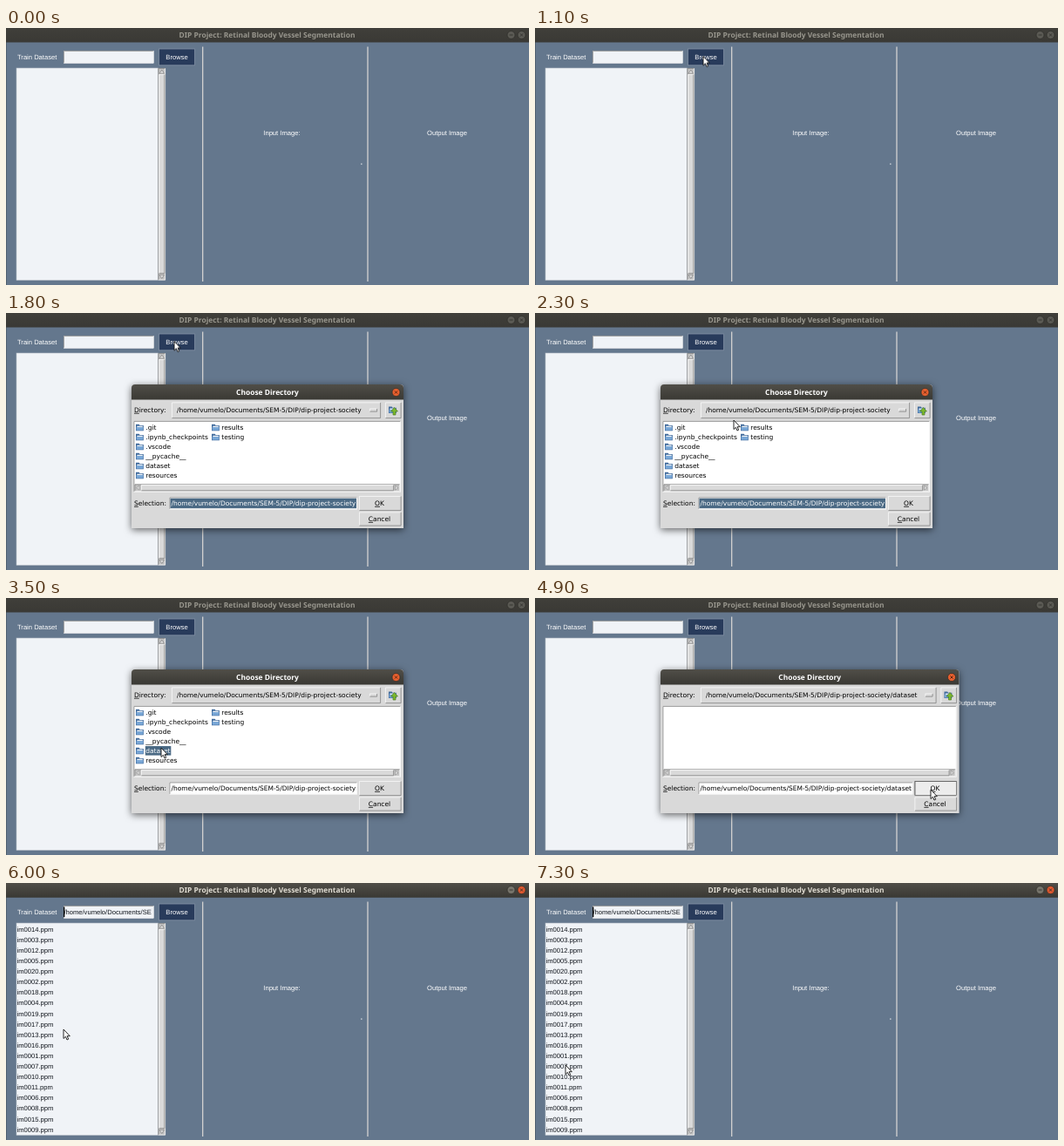
Write an HTML page that moves like this. It is 600 by 295 pixels and loops after 8000 ms.

```html
<!DOCTYPE html>
<html lang="en">
<head>
<meta charset="utf-8">
<title>Vessel segmentation</title>
<style>
html, body { margin: 0; width: 100%; height: 100%; overflow: hidden; background: #64778d; }
svg { display: block; width: 600px; height: 295px; }
text { white-space: pre; text-rendering: geometricPrecision; }
.app { font: 7.6px "Liberation Sans", Arial, sans-serif; fill: #fff; }
.ink { fill: #10151c; }
.tk { font: 7.47px "DejaVu Sans", sans-serif; fill: #000; }
.title { font: bold 8.42px "Noto Sans", sans-serif; text-anchor: middle; }
.mid { text-anchor: middle; }
.key { text-decoration: underline; }
.light { fill: #fff; }

.active, .loaded, .caret, .first, .picked, .wide, .combo-hover, .ok-hover, .ok-press, .cursor {
  animation: 8s step-end infinite;
  opacity: 0;
}
.active { animation-name: active; }
.loaded { animation-name: loaded; }
.caret { animation-name: caret; }
.first { animation-name: first; }
.narrow { animation: narrow 8s step-end infinite; }
.picked { animation-name: picked; }
.wide { animation-name: wide; }
.combo-hover { animation-name: combo-hover; }
.ok-hover { animation-name: ok-hover; }
.ok-press { animation-name: ok-press; }
.cursor { animation: appear 8s step-end infinite, move 8s linear infinite; }
.dialog { transform-origin: 300px 165px; animation: dialog 8s linear infinite; }

@keyframes active { 0%, 19.375% { opacity: 0 } 15%, 66.25%, 100% { opacity: 1 } }
@keyframes loaded { 0% { opacity: 0 } 66.25%, 100% { opacity: 1 } }
@keyframes caret { 0%, 82.5% { opacity: 0 } 66.25%, 86.25%, 100% { opacity: 1 } }
@keyframes first { 0% { opacity: 1 } 42.5%, 100% { opacity: 0 } }
@keyframes narrow { 0% { opacity: 1 } 46.25%, 100% { opacity: 0 } }
@keyframes picked { 0% { opacity: 0 } 42.5%, 100% { opacity: 1 } }
@keyframes wide { 0% { opacity: 0 } 46.25%, 100% { opacity: 1 } }
@keyframes combo-hover { 0%, 28.6%, 100% { opacity: 0 } 27.4% { opacity: 1 } }
@keyframes ok-hover { 0% { opacity: 0 } 55%, 100% { opacity: 1 } }
@keyframes ok-press { 0% { opacity: 0 } 60%, 100% { opacity: 1 } }
@keyframes appear { 0% { opacity: 0 } 3.75%, 100% { opacity: 1 } }
@keyframes dialog {
  0% { transform: scaleY(0); opacity: 0 }
  19.125% { transform: scaleY(0); opacity: 0; animation-timing-function: cubic-bezier(.25, .46, .45, .94) }
  22.25% { transform: none; opacity: 1 }
  63.2% { transform: none; opacity: 1; animation-timing-function: cubic-bezier(.25, .46, .45, .94) }
  66.25%, 100% { transform: scaleY(0); opacity: 0 }
}
@keyframes move {
  0%, 3.75% { transform: translate(561px, 126px); animation-timing-function: ease-in-out }
  13.75%, 23.75% { transform: translate(193px, 32.5px) }
  25% { transform: translate(199px, 60px) }
  27.5% { transform: translate(215px, 104px) }
  28.75% { transform: translate(228px, 123px); animation-timing-function: ease-in-out }
  36.25% { transform: translate(189px, 173px) }
  40%, 50.5% { transform: translate(178px, 172px); animation-timing-function: ease-in-out }
  55% { transform: translate(452px, 226px) }
  56.25%, 67.5% { transform: translate(454px, 220px); animation-timing-function: ease-in-out }
  73.75%, 75.5% { transform: translate(66px, 168px) }
  78.75% { transform: translate(72px, 182px) }
  81.25% { transform: translate(30px, 212px) }
  83.75%, 100% { transform: translate(35px, 209px) }
}
</style>
</head>
<body>
<svg id="stage" viewBox="0 0 600 295" xmlns="http://www.w3.org/2000/svg"></svg>
<script>
const rect = (x, y, w, h, fill, more = '') =>
  `<rect x="${x}" y="${y}" width="${w}" height="${h}" fill="${fill}" ${more}/>`;
const line = (d, stroke, width = 1) =>
  `<path d="${d}" fill="none" stroke="${stroke}" stroke-width="${width}"/>`;
const text = (x, y, s, cls) => `<text x="${x}" y="${y}" class="${cls}">${s}</text>`;
const group = (cls, ...parts) => `<g class="${cls}">${parts.join('')}</g>`;
const key = word => `<tspan class="key">${word[0]}</tspan>${word.slice(1)}`;

function bevel(x, y, w, h, fill = '#d9d9d9', sunken = false) {
  const [lit, dark] = sunken ? ['#828282', '#f4f4f4'] : ['#fafafa', '#828282'];
  const l = x + .4, t = y + .4, r = x + w - .4, b = y + h - .4;
  return rect(x, y, w, h, fill) +
    line(`M${l} ${b}V${t}H${r}`, lit, .8) + line(`M${l} ${b}H${r}V${t}`, dark, .8);
}

const folder = (x, y) =>
  `<path d="M${x} ${y + 8}v-7.5h3.6l1 1.3h4.2v6.2z" fill="#3f699b"/>` +
  rect(x + 1.3, y + 2.5, 6.5, 2, '#eef3f8') +
  rect(x + .6, y + 3.8, 7.7, 3.7, '#79a7d6');

function windowButton(x, y, fill, stroke, mark) {
  return `<circle cx="${x}" cy="${y}" r="4.5" fill="${fill}" stroke="#2c2b28" stroke-width=".7"/>` +
    line(mark === 'close'
      ? `M${x - 1.6} ${y - 1.6}l3.2 3.2m0-3.2l-3.2 3.2`
      : `M${x - 2} ${y}h4`, stroke, .9);
}

function titleBar(active) {
  return rect(0, 0, 600, 16.5, active ? 'url(#bar)' : 'url(#dimBar)') +
    text(299.5, 11, 'DIP Project: Retinal Bloody Vessel Segmentation',
      'title" fill="' + (active ? '#e0dcd2' : '#98968d')) +
    windowButton(579.5, 8, active ? '#77756c' : '#5b5a54', '#33322e', 'min') +
    windowButton(591.5, 8, active ? '#e2592f' : '#5b5a54', '#33322e', 'close');
}

function scrollbar() {
  return bevel(174.5, 46, 8.5, 243.5, '#c3c3c3', true) + bevel(175.3, 53, 7, 229) +
    `<path d="M178.8 48l2.8 4.2h-5.6zM178.8 287.6l2.8-4.2h-5.6z" fill="#d9d9d9" stroke="#777" stroke-width=".6"/>`;
}

function mainWindow() {
  const order = [14, 3, 12, 5, 20, 2, 18, 4, 19, 17, 13, 16, 1, 7, 10, 11, 6, 8, 15, 9];
  const files = order.map((n, i) =>
    text(12.6, 55.7 + i * 12.1, `im${String(n).padStart(4, '0')}.ppm`, 'app ink'));
  return rect(0, 0, 600, 295, '#64778d') + rect(0, 16, .7, 279, '#4b5866') +
    titleBar(false) + group('active', titleBar(true)) +
    text(13, 36.3, 'Train Dataset', 'app') +
    bevel(66, 26, 103.5, 14.5, '#f0f3f7', true) +
    rect(175.5, 24, 41, 18.8, '#283b5b', 'stroke="#8190a3" stroke-width=".8"') +
    text(196, 36.3, 'Browse', 'app mid') +
    rect(12, 46, 162.5, 243.5, '#f0f3f7', 'stroke="#b9c0c8" stroke-width=".6"') +
    scrollbar() +
    line('M225.7 21.5V291M415 21.5V291', '#dcdad7', 1.2) +
    text(295.3, 122.8, 'Input Image:', 'app') +
    text(483, 122.8, 'Output Image', 'app') +
    rect(407, 155.5, 1.6, 1.2, '#d5dae0') +
    group('loaded', ...files, text(66.4, 36.3, '/home/vumelo/Documents/SE', 'app ink')) +
    rect(66, 27.5, 1.3, 11.5, '#000', 'class="caret"');
}

const home = '/home/vumelo/Documents/SEM-5/DIP/dip-project-society';

// extra: how much wider the dialog is than its smallest size
function dialogFrame(extra, path) {
  const right = 456 + extra;
  const up = right - 21;
  const ok = right - 51;
  const center = right - 27.5;
  const bar = right - 153;
  return `<path d="M144 247V86q0-4 4-4H${right - 4}q4 0 4 4V247z" fill="#d9d9d9" filter="url(#shadow)"/>` +
    `<path d="M144 99.5V86q0-4 4-4H${right - 4}q4 0 4 4V99.5z" fill="url(#bar)"/>` +
    text((144 + right) / 2, 94, 'Choose Directory', 'title light') +
    windowButton(right - 8.5, 91, '#e9602f', '#54230f', 'close') +
    text(147, 113.8, key('Directory:'), 'tk') +
    bevel(190, 102.5, right - 216, 18.5) +
    group('combo-hover', rect(191, 103.5, right - 218, 16.5, '#ececec')) +
    text(196, 113.8, path, 'tk') +
    bevel(right - 39, 109.5, 9, 4) +
    bevel(up, 102.5, 18.5, 18.5) + folder(up + 4, 107) +
    `<path d="M${up + 9} 117v-4h-2.5l4-4.5 4 4.5h-2.5v4z" fill="#7cb82f" stroke="#41721a" stroke-width=".6"/>` +
    bevel(146.5, 124, right - 149.5, 81.5, '#fff', true) +
    bevel(147.5, 196.5, right - 151.5, 8.3, '#c3c3c3', true) +
    bevel(155, 197.2, bar - 13, 7) +
    `<path d="M149.5 200.7l3.5-2.5v5zM${right - 6} 200.7l-3.5-2.5v5z" fill="#d9d9d9" stroke="#888" stroke-width=".5"/>` +
    text(147, 220.9, key('Selection:'), 'tk') +
    bevel(187.5, 211.5, right - 240.5, 14, '#fff', true) +
    text(189.5, 220.9, path, 'tk') +
    bevel(ok, 210, 48.5, 17) +
    (extra ? group('ok-hover', bevel(ok, 210, 48.5, 17, '#ececec')) +
      group('ok-press', bevel(ok, 210, 48.5, 17, '#ececec', true),
        rect(ok + .4, 210.4, 47.7, 16.2, 'none', 'stroke="#555" stroke-width=".7"')) : '') +
    text(center, 220.9, key('OK'), 'tk mid') +
    bevel(ok, 228.5, 48.5, 16) + text(center, 238.9, key('Cancel'), 'tk mid');
}

function folderList() {
  const columns = [
    ['.git', '.ipynb_checkpoints', '.vscode', '__pycache__', 'dataset', 'resources'],
    ['results', 'testing']
  ];
  return columns.map((names, c) => names.map((name, i) =>
    folder(149 + c * 87, 127.2 + i * 11) +
    text(160.3 + c * 87, 134 + i * 11, name, 'tk')).join('')).join('');
}

function dialog() {
  return group('dialog',
    group('narrow',
      dialogFrame(0, home), folderList(),
      group('first', rect(188.5, 212.8, 213.5, 11.4, '#4a6984'), text(189.5, 220.9, home, 'tk light')),
      group('picked', rect(159.8, 170, 29.5, 10.6, '#4a6984'), text(160.3, 178, 'dataset', 'tk light'))),
    group('wide', dialogFrame(30.5, home + '/dataset')));
}

const gradient = (id, top, bottom) =>
  `<linearGradient id="${id}" x2="0" y2="1"><stop stop-color="${top}"/><stop offset="1" stop-color="${bottom}"/></linearGradient>`;

document.getElementById('stage').innerHTML =
  `<defs>${gradient('bar', '#504e48', '#3a3934')}${gradient('dimBar', '#403f3a', '#3a3935')}
    <filter id="shadow" x="-10%" y="-15%" width="120%" height="130%">
      <feDropShadow dx="0" dy="2" stdDeviation="4" flood-color="#000" flood-opacity=".6"/>
    </filter></defs>` +
  mainWindow() + dialog() +
  `<path class="cursor" d="M0 0V10.5L2.4 8.3 4 12 5.7 11.2 4.1 7.7H7.3Z" fill="#fff" stroke="#111" stroke-width=".9"/>`;
</script>
</body>
</html>
```
